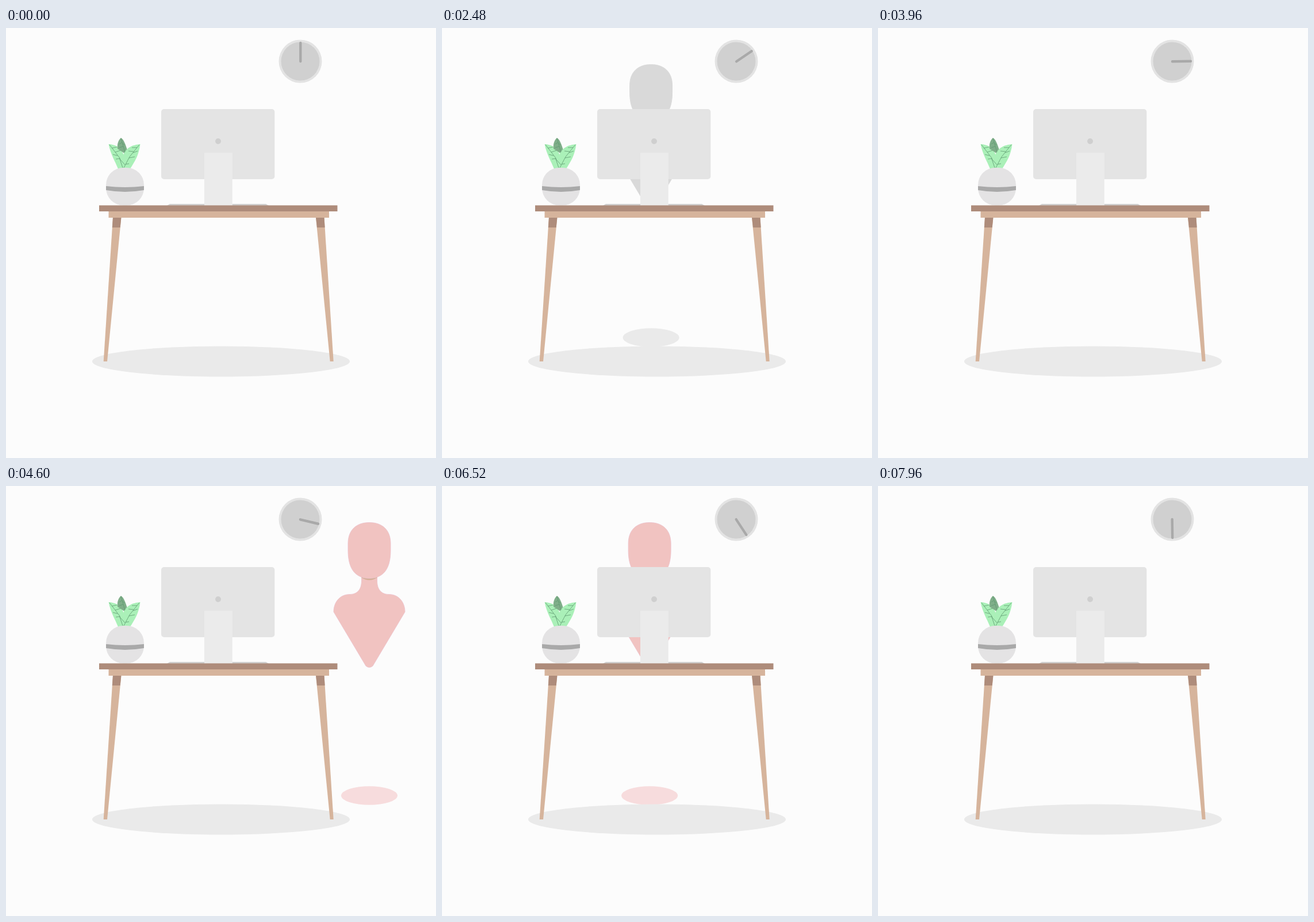
An HTML page that plays this animation: 748 px wide and 748 px high, repeating every 8000 ms.

```html
<!DOCTYPE html>
<html lang="en">
<head>
<meta charset="utf-8">
<title>Desk</title>
<style>
  html, body { margin: 0; width: 100%; height: 100%; overflow: hidden; background: #fcfcfc; }
  svg { display: block; width: 100vw; height: 100vh; }
  .visitor { --skin: #d9d9d9; --shade: #c5c5c5; --ground: #eaeaea; --rim: #d9d9d9; }
  .pink { --skin: #f1c3c1; --shade: #d5b098; --ground: #f7dcdd; --rim: #e9c5d8; }
  .skin { fill: var(--skin); }
  .rim { fill: none; stroke: var(--rim); stroke-width: .9; }
  .shade { fill: var(--shade); }
  .ground { fill: var(--ground); }
  .wood { fill: #d6b49c; }
  .dark { fill: #ae8c7b; }
  .vein { fill: none; stroke: #5f9a70; stroke-width: .8; }
</style>
</head>
<body>
<svg viewBox="0 0 748 748">
  <defs>
    <path id="torso" d="M-13.5 145V165C-13.5 181-22 188.500-34 188.500C-52 188.500-62 203-62 219L-6 313Q0 318 6 313L62 219C62 203 52 188.500 34 188.500C22 188.500 13.500 181 13.500 165V145Z"/>
    <path id="head" d="M-37 100C-37 76-22 63.500 0 63.500S37 76 37 100V112C37 146 23 160.500 0 160.500S-37 146-37 112Z"/>
    <g id="person">
      <ellipse class="ground" cy="538.5" rx="49" ry="16.300"/>
      <use href="#torso" class="rim"/>
      <use href="#torso" class="skin"/>
      <path class="shade" d="M-13.500 150H13.500V159.500Q0 168-13.500 159.500Z"/>
      <use href="#head" class="rim"/>
      <use href="#head" class="skin"/>
    </g>
  </defs>

  <g id="clock">
    <circle cx="512" cy="58" r="37.500" fill="#e3e3e3"/>
    <circle cx="512" cy="58" r="33.500" fill="#d0d0d0"/>
    <path id="hand" d="M512.300 58V26" stroke="#a9a9a9" stroke-width="4.400" stroke-linecap="round"/>
  </g>

  <use href="#person" class="visitor"/>
  <use href="#person" class="visitor pink"/>

  <ellipse cx="374" cy="580" rx="224" ry="26.500" fill="#eaeaea"/>

  <g id="plant">
    <path fill="#aaf0b8" d="M178.500 202C192 203 203 209 206 226V245H195C190 232 182 220 178.500 202Z"/>
    <path fill="#7fae89" d="M200 191C195 195 193 203 194 210L206 218L210.500 211C208 203 205 194 200 191Z"/>
    <path fill="#aaf0b8" d="M233.500 202C231 222 224 232 216 245H200C200 232 203 215 214 208C220 204 226 203 233.500 202Z"/>
    <path class="vein" d="M180 203L197 225L203 243M184 209L193 207M190 216L199 213M186 220L194 222M191 228L199 227"/>
    <path class="vein" d="M232 203L215 224L205 243M228 208L219 208M222 215L213 214M229 214L221 217M224 224L214 226M207 238L198 228M214 236L208 237"/>
    <path class="vein" d="M200 192L207 216M202 199L197 202M204 206L197 208M203 201L206 203"/>
    <rect x="174" y="243" width="66" height="65.500" rx="30" fill="#e4e3e4"/>
    <path fill="#a9a9a9" d="M174 275Q207 279 240 275V282Q207 288 174 282Z"/>
  </g>

  <g id="monitor">
    <rect x="270" y="141" width="197.300" height="122" rx="5" fill="#e4e4e4"/>
    <circle cx="369" cy="197" r="5" fill="#cfcfcf"/>
    <path fill="#d0d0d0" d="M285 306H452L457 309H280Z"/>
    <rect x="345" y="217" width="48.800" height="92" fill="#ebebeb"/>
  </g>

  <g id="desk">
    <path class="wood" d="M186 329H200.500L176 580H169.700Z"/>
    <path class="wood" d="M539 329H553.500L569.700 580H563.700Z"/>
    <path class="dark" d="M186 329H200.500L198.700 347H184.800Z"/>
    <path class="dark" d="M539 329H553.500L554.600 347H541Z"/>
    <rect class="wood" x="178.500" y="318" width="383.500" height="12"/>
    <rect class="dark" x="162" y="308.500" width="414.500" height="10.500"/>
  </g>
</svg>
<script>
  const LOOP = 8000, PASS = 4000, TICK = 40;

  // [time, x] stations of one walk behind the desk
  const walk = [
    [0, 875], [240, 788], [600, 632], [880, 504.5], [1000, 443], [1080, 413],
    [1280, 370], [1920, 367.5], [2400, 366], [2560, 358], [2760, 299],
    [3120, 177], [3280, 112.5], [3400, 69], [3600, -5], [3800, -75], [4000, -135]
  ];

  const slopes = walk.slice(1).map(([t, x], i) => (x - walk[i][1]) / (t - walk[i][0]));

  // Harmonic mean of neighbouring slopes keeps the curve monotone
  const tangents = walk.map((_, i) => {
    const a = slopes[i - 1] ?? slopes[i], b = slopes[i] ?? a;
    return 2 * a * b / (a + b);
  });

  function walkX(t) {
    const i = Math.max(0, walk.findIndex(p => p[0] > t) - 1);
    const [t0, x0] = walk[i], [t1, x1] = walk[i + 1];
    const h = t1 - t0, u = (t - t0) / h, v = 1 - u;
    return v * v * (1 + 2 * u) * x0 + u * u * (3 - 2 * u) * x1
      + h * u * v * (v * tangents[i] - u * tangents[i + 1]);
  }

  const hand = document.getElementById("hand");
  const visitors = document.querySelectorAll(".visitor");
  const start = performance.now();

  function draw(now) {
    let t = Math.floor(Math.max(0, now - start) % LOOP / TICK) * TICK;
    if (t < 2 * TICK) t = 0;
    hand.setAttribute("transform", `rotate(${t / LOOP * 180} 512 58)`);
    visitors.forEach((visitor, i) => {
      const local = t - i * PASS;
      const active = local >= 0 && local < PASS;
      visitor.style.display = active ? "" : "none";
      if (active) visitor.setAttribute("transform", `translate(${walkX(local)} 0)`);
    });
    requestAnimationFrame(draw);
  }
  draw(start);
</script>
</body>
</html>
```
